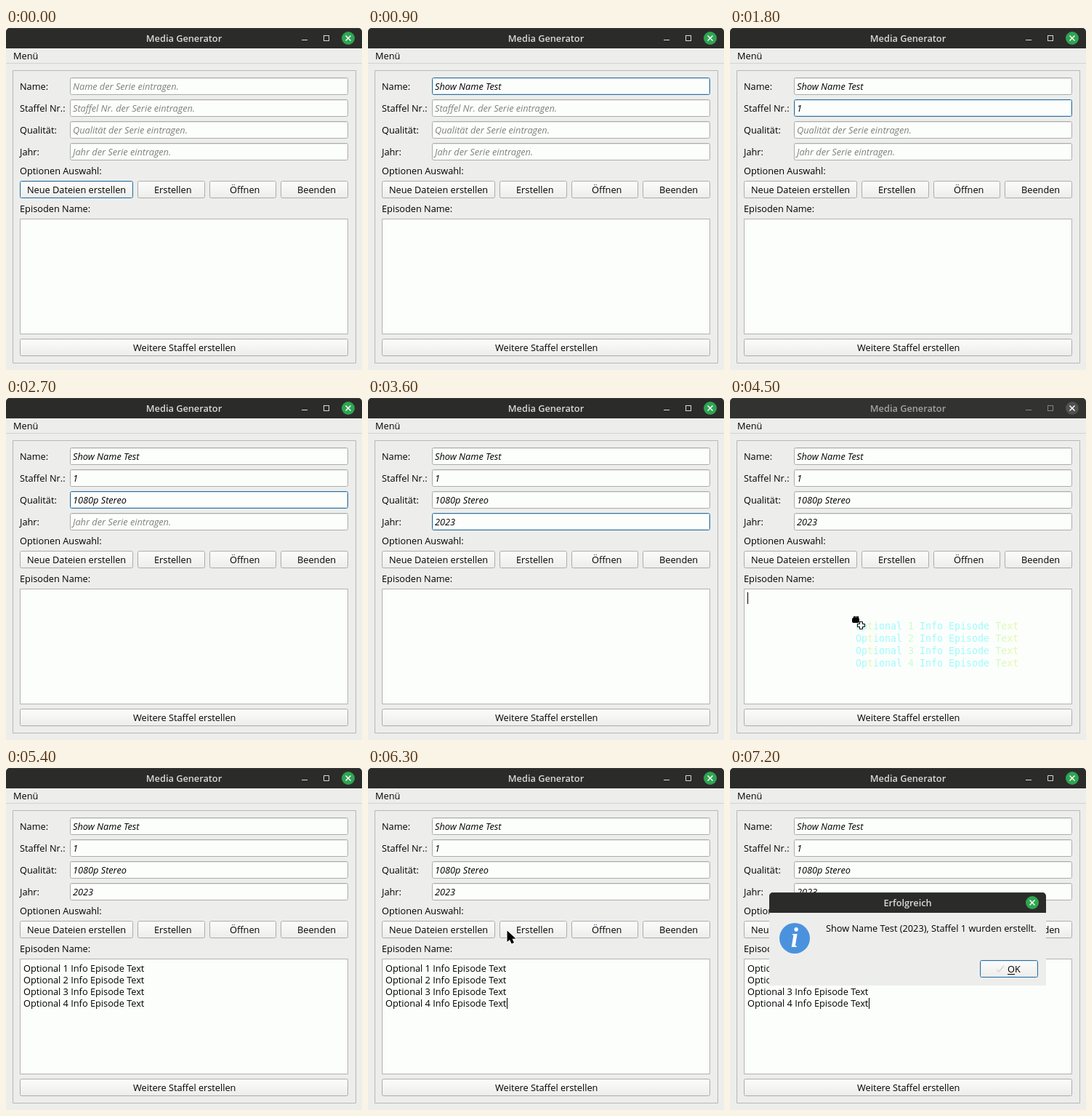
Write an HTML page with a canvas that moves like this. It is 490 px wide and 470 px high and loops after 8000 ms.

```html
<!DOCTYPE html>
<html lang="de">
<head>
<meta charset="utf-8">
<title>Media Generator</title>
<style>
  html, body { margin: 0; width: 100%; height: 100%; overflow: hidden; background: #fff; }
  canvas { display: block; }
</style>
</head>
<body>
<canvas id="stage" width="490" height="470"></canvas>
<script>
const ctx = document.getElementById('stage').getContext('2d');

const LOOP = 8000;
const STEP = 900;
const SANS = '12.75px "Open Sans", "Noto Sans", sans-serif';
const ITALIC = 'italic ' + SANS;
const TITLE = '600 ' + SANS;
const MONO = '13.3px "DejaVu Sans Mono", monospace';

const WINDOW = '#edeeec';
const BASE = '#fcfefc';
const BORDER = '#acadab';
const FOCUS = '#2f6f9f';
const GREEN = '#2fa552';

const FIELDS = [
  { label: 'Name:', hint: 'Name der Serie eintragen.', value: 'Show Name Test' },
  { label: 'Staffel Nr.:', hint: 'Staffel Nr. der Serie eintragen.', value: '1' },
  { label: 'Qualität:', hint: 'Qualität der Serie eintragen.', value: '1080p Stereo' },
  { label: 'Jahr:', hint: 'Jahr der Serie eintragen.', value: '2023' }
];
const EPISODES = [1, 2, 3, 4].map(n => `Optional ${n} Info Episode Text`);

function text(str, x, y, font = SANS, color = '#000', align = 'left') {
  ctx.font = font;
  ctx.fillStyle = color;
  ctx.textAlign = align;
  ctx.fillText(str, x, y);
}

function rect(x, y, w, h, color) {
  ctx.fillStyle = color;
  ctx.fillRect(x, y, w, h);
}

function disc(x, y, r, color) {
  ctx.fillStyle = color;
  ctx.beginPath();
  ctx.arc(x, y, r, 0, Math.PI * 2);
  ctx.fill();
}

function polygon(points, fill, stroke, width = 1) {
  ctx.beginPath();
  points.forEach(([x, y]) => ctx.lineTo(x, y));
  ctx.closePath();
  ctx.lineWidth = width;
  ctx.lineJoin = 'round';
  ctx.strokeStyle = stroke;
  ctx.stroke();
  ctx.fillStyle = fill;
  ctx.fill();
}

function polyline(points, color, width) {
  ctx.beginPath();
  points.forEach(([x, y]) => ctx.lineTo(x, y));
  ctx.strokeStyle = color;
  ctx.lineWidth = width;
  ctx.stroke();
}

// A one pixel outline that lies inside the given box.
function box(x, y, w, h, fill, stroke, radius = 2) {
  ctx.beginPath();
  ctx.roundRect(x + 0.5, y + 0.5, w - 1, h - 1, radius);
  ctx.fillStyle = fill;
  ctx.fill();
  ctx.lineWidth = 1;
  ctx.strokeStyle = stroke;
  ctx.stroke();
}

function titleBar(x, y, w, label, labelX, active) {
  ctx.beginPath();
  ctx.roundRect(x, y, w, 28, [5, 5, 0, 0]);
  ctx.fillStyle = active ? '#2b2c2a' : '#323331';
  ctx.fill();
  rect(x + 5, y, w - 10, 1, active ? '#3b3c3a' : '#3d3e3c');
  text(label, labelX, y + 19, TITLE, active ? '#dadada' : '#a2a3a1', 'center');

  const cx = x + w - 19, cy = y + 14, d = 3.5;
  disc(cx, cy, 9, active ? GREEN : '#515250');
  polyline([[cx - d, cy - d], [cx + d, cy + d]], '#fff', 1.5);
  polyline([[cx - d, cy + d], [cx + d, cy - d]], '#fff', 1.5);
}

function windowControls(active) {
  const color = active ? '#dadada' : '#858684';
  rect(407, 16, 8, 1, color);
  ctx.strokeStyle = color;
  ctx.lineWidth = 1;
  ctx.strokeRect(437.5, 10.5, 7, 7);
}

function button(label, x, y, w, labelX, focused) {
  const shade = ctx.createLinearGradient(0, y, 0, y + 24);
  shade.addColorStop(0, '#fdfdfd');
  shade.addColorStop(1, '#ececea');
  box(x, y, w, 24, shade, focused ? FOCUS : BORDER);
  if (focused) box(x + 1, y + 1, w - 2, 22, 'transparent', '#d5e6f1', 1);
  text(label, labelX, y + 17);
}

function field({ label, hint, value }, i, filled, focused) {
  const y = 68 + i * 30;
  text(label, 19, y + 17);
  box(88, y, 383, 24, BASE, focused ? FOCUS : BORDER);
  if (focused) box(89, y + 1, 381, 22, 'transparent', '#cfe3f0', 1);
  else rect(90, y + 1, 379, 1, '#e6e8e6');
  text(filled ? value : hint, 92, y + 17, ITALIC, filled ? '#000' : '#7f807f');
}

function draggedText() {
  const tint = ctx.createLinearGradient(173, 0, 397, 0);
  [['#a5fbfb', 0], ['#a0fcfc', 0.06], ['#f4f8a0', 0.09], ['#9dfcfc', 0.13],
   ['#9dfcfc', 0.29], ['#d2fbc4', 0.34], ['#9dfcfc', 0.4], ['#9dfcfc', 0.8],
   ['#d4fac0', 0.87], ['#e6f8a8', 1]].forEach(([c, at]) => tint.addColorStop(at, c));
  EPISODES.forEach((line, i) => text(line, 173, 318 + i * 17, MONO, tint));
}

function dragCursor() {
  ctx.fillStyle = '#000';
  ctx.beginPath();
  ctx.roundRect(168, 302, 10, 7, 2);
  ctx.fill();
  for (const x of [170, 172.5, 175]) rect(x, 300, 2, 4, '#000');
  polygon([[179, 308], [182, 308], [182, 311], [185, 311], [185, 314], [182, 314],
           [182, 317], [179, 317], [179, 314], [176, 314], [176, 311], [179, 311]],
          '#fff', '#000', 2);
}

function arrowCursor() {
  polygon([[191.5, 223.5], [191.5, 239], [195, 236], [197.7, 241.5], [201, 240],
           [198.5, 234.8], [203.5, 234.5]], '#000', '#fff', 2);
}

function dialog() {
  titleBar(54, 171, 381, 'Erfolgreich', 244.5, true);
  rect(54, 199, 381, 100, WINDOW);
  disc(89, 234, 21, '#4b92de');
  text('i', 89, 246, 'italic bold 37px "Liberation Serif", serif', '#fff', 'center');
  text('Show Name Test (2023), Staffel 1 wurden erstellt.', 132, 225);
  button('OK', 344, 264, 80, 382, true);
  rect(382, 283, 10, 1, '#000');
  polyline([[367, 277], [370, 280], [377, 272]], '#dcdddb', 2);
}

function draw(time) {
  const step = Math.floor((time % LOOP) / STEP);
  const dragging = step === 5;
  const active = !dragging;

  rect(0, 0, 490, 470, '#fff');
  rect(0, 20, 490, 450, WINDOW);
  titleBar(0, 0, 490, 'Media Generator', 245, active);
  windowControls(active);
  text('Menü', 10, 43);
  rect(0, 48, 490, 1, '#d3d4d2');
  box(9, 58, 473, 403, WINDOW, '#b7b8b6', 0);

  FIELDS.forEach((f, i) => field(f, i, step > i, step === i + 1));

  text('Optionen Auswahl:', 19, 201);
  button('Neue Dateien erstellen', 19, 210, 156, 29, step === 0);
  button('Erstellen', 181, 210, 93, 204);
  button('Öffnen', 280, 210, 92, 308);
  button('Beenden', 378, 210, 93, 401);

  text('Episoden Name:', 19, 253);
  box(19, 262, 452, 159, BASE, '#b3b4b2', 0);
  button('Weitere Staffel erstellen', 19, 427, 452, 175);

  if (dragging) {
    rect(24, 267, 1, 16, '#000');
    draggedText();
    dragCursor();
  }
  if (step >= 6) EPISODES.forEach((line, i) => text(line, 24, 280 + i * 16));
  if (step >= 7) rect(191, 316, 1, 15, '#000');
  if (step === 7) arrowCursor();
  if (step >= 8) dialog();
}

const start = performance.now();
function tick() {
  draw(performance.now() - start);
  requestAnimationFrame(tick);
}
tick();
</script>
</body>
</html>
```
